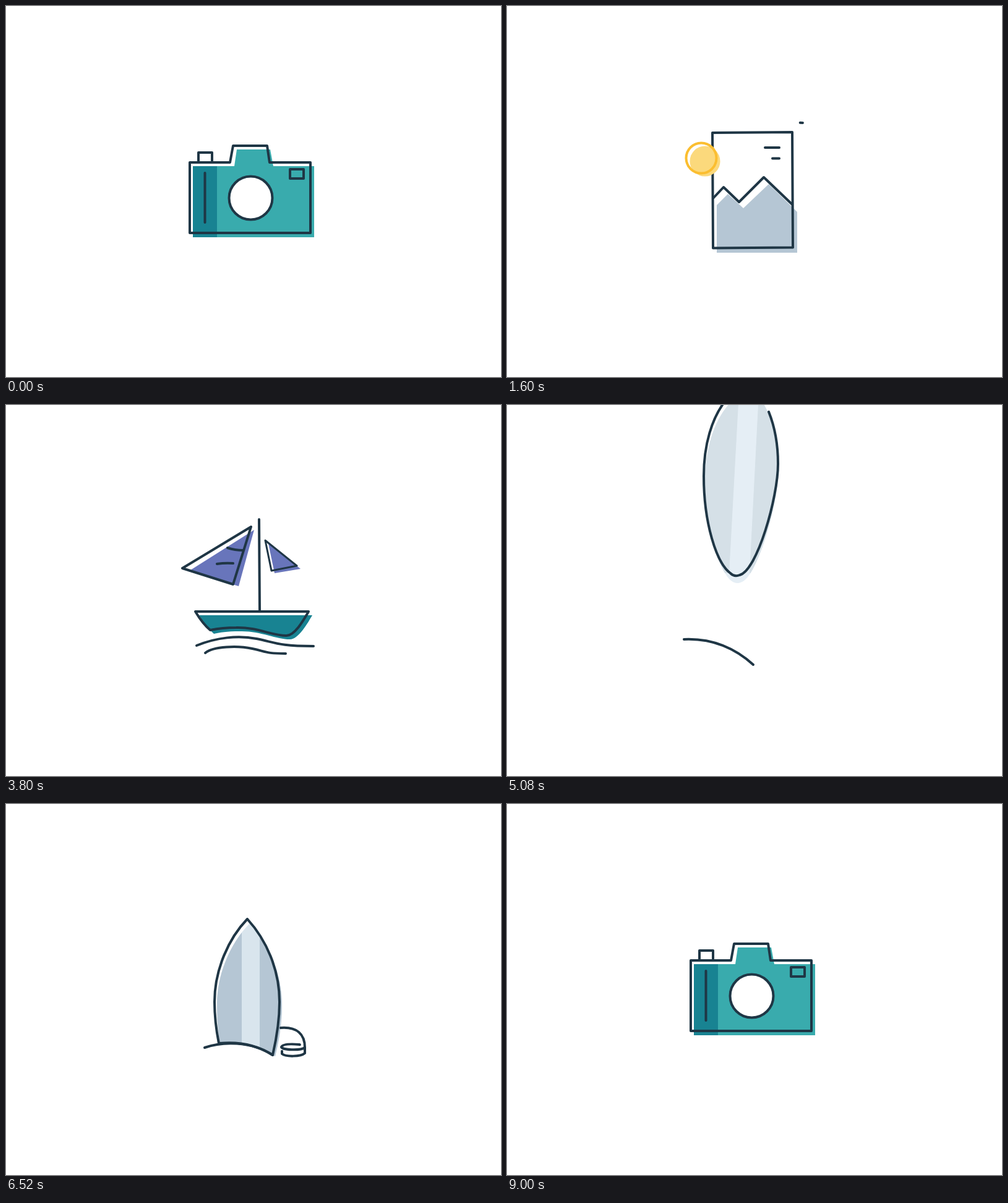
These frames come from a looping animation (800 px wide and 600 px high, 9040 ms). An HTML page:

```html
<!DOCTYPE html>
<html lang="en">
<head>
<meta charset="utf-8">
<title>Holiday icons</title>
<style>
html, body { margin: 0; width: 100%; height: 100%; overflow: hidden; background: #fff; }
svg { display: block; width: 100vw; height: 100vh; }
</style>
</head>
<body>
<svg id="stage" viewBox="0 0 800 600"><defs><clipPath id="boardClip"></clipPath></defs></svg>
<script>
const LOOP = 9040;
const INK = 'rgb(31,54,69)', TEAL = 'rgb(57,171,173)', DEEP = 'rgb(24,131,146)';
const GREY = 'rgb(181,198,212)', PALE = 'rgb(217,229,237)', PURPLE = 'rgb(104,117,187)';
const stage = document.getElementById('stage');
const parts = [];

// Blend two strings by blending the numbers inside them.
const NUM = /-?\d*\.?\d+/g;
function mix(a, b, k) {
  const to = b.match(NUM);
  let i = 0;
  return a.replace(NUM, n => (+n + (to[i++] - n) * k).toFixed(3));
}

function sample(keys, t) {
  if (t <= keys[0][0]) return keys[0][1];
  for (let i = 1; i < keys.length; i++) {
    const [t0, a] = keys[i - 1], [t1, b] = keys[i];
    if (t < t1) {
      const k = (t - t0) / (t1 - t0);
      return mix(a, b, k * k * (3 - 2 * k));
    }
  }
  return keys[keys.length - 1][1];
}

function add(parent, tag, span, attrs, tracks = {}) {
  const el = document.createElementNS('http://www.w3.org/2000/svg', tag);
  for (const name in attrs) el.setAttribute(name, attrs[name]);
  parent.appendChild(el);
  parts.push({ el, span, tracks });
  return el;
}

const shape = (parent, span, fill, tracks, d = '') => add(parent, 'path', span, { fill, d }, tracks);
const line = (parent, span, d, tracks, width = 4) => add(parent, 'path', span, {
  d, fill: 'none', stroke: INK, 'stroke-width': width, pathLength: 100,
  'stroke-linecap': 'round', 'stroke-linejoin': 'round'
}, tracks);
const drawn = (a, b, c, d) => [[a, '0 0'], [b, '0 100'], [c, '0 100'], [d, '100 100']];

// Boat
const AFLOAT = [2800, 4720];
const boat = add(stage, 'g', AFLOAT, {}, { transform: [
  [2900, 'rotate(3 400 370)'], [3400, 'rotate(-1.5 400 370)'], [3800, 'rotate(0 400 370)'],
  [4120, 'rotate(.8 400 370)'], [4400, 'rotate(0 400 370)']] });
const hull = 'L489 334C482 346 467 373 453 373C430 373 405 359 372 360C350 360 340 362 330 364Q318 354 306 334Z';
shape(boat, [2920, 4680], DEEP, { transform: [
  [2920, 'translate(6 6) translate(400 340) scale(1 .85) translate(-400 -340)'],
  [3240, 'translate(6 6) translate(400 340) scale(1 1) translate(-400 -340)'],
  [4320, 'translate(6 6) translate(400 340) scale(1 1) translate(-400 -340)'],
  [4680, 'translate(6 6) translate(400 370) scale(0 0) translate(-400 -340)']] }, 'M306 334' + hull);
line(boat, AFLOAT, 'M306 334' + hull, { trim: drawn(2880, 3360, 4280, 4640) });
line(boat, AFLOAT, 'M410 333L409 185', { trim: drawn(2840, 3240, 4320, 4600) });

const sail = add(boat, 'g', [3000, 4440], {}, { transform: [
  [3000, 'translate(404 250) rotate(40) scale(0)'], [3360, 'translate(397 202) rotate(12) scale(.9)'],
  [3800, 'translate(396 197) rotate(0) scale(1)'], [4120, 'translate(396 197) rotate(-18.5) scale(1)'],
  [4280, 'translate(396 197) rotate(-17) scale(1)']] });
shape(sail, [3000, 4440], PURPLE, {}, 'M5 5L-101 72L-20 96Z');
line(sail, [3000, 4440], 'M0 0L-111 67L-29 93Z', {});
line(sail, [3000, 4440], 'M-13 38Q-26 38 -38 34', { trim: [[3480, '0 0'], [3760, '0 100']] });
line(sail, [3000, 4440], 'M-29 59Q-42 58 -55 60', { trim: [[3520, '0 0'], [3800, '0 100']] });

const jib = add(boat, 'g', [3240, 4640], {}, { transform: [
  [3240, 'translate(412 250) rotate(-30) scale(0)'], [3800, 'translate(419 219) rotate(0) scale(1)'],
  [4160, 'translate(419 219) rotate(13) scale(1.32)'], [4320, 'translate(419 219) rotate(11.5) scale(1.3)'],
  [4640, 'translate(412 240) rotate(-20) scale(0)']] });
shape(jib, [3240, 4640], PURPLE, {}, 'M5 5L57 46L15 53Z');
line(jib, [3240, 4640], 'M0 0L51 41L10 49Z', {}, 3);

line(stage, AFLOAT, 'M308 389C340 376 375 372 405 378S440 390 497 390', { trim: drawn(2960, 3480, 4280, 4680) });
line(stage, AFLOAT, 'M322 401C335 390 375 389 398 394S420 402 452 402', { trim: drawn(3080, 3600, 4320, 4680) });

// Surfboard
const SURF = [4440, 7480], SOLID = [4440, 7200];
const skin = [
  [4440, 'M401 202C401 220 401 235 401 250C401 267 401 285 401 299C372 299 343 298 314 298C328 282 343 266 357 250C372 234 387 218 401 202'],
  [5080, 'M395 -25C425 0 439 50 439 100C439 160 405 275 380 286C374 289 368 289 362 284C340 265 320 190 320 115C322 55 345 -10 395 -25'],
  [5560, 'M394 150C430 190 448 260 448 330C448 362 441 394 433 418C407 402 377 396 344 398C338 374 336 352 336 330C336 260 360 182 394 150'],
  [5960, 'M394 198C427 232 449 277 449 328C449 356 442 385 436 409C409 394 379 388 345 389C340 366 338 345 338 325C338 275 362 226 394 198'],
  [6400, 'M394 193C425 227 446 274 446 326C446 355 441 384 435 408C409 393 379 387 346 388C342 365 341 344 341 324C341 272 365 222 394 193']];
shape(document.getElementById('boardClip'), SOLID, '#000', { d: skin });
shape(stage, SOLID, PALE, { d: skin,
  fill: [[4440, PURPLE], [5000, 'rgb(229,238,245)'], [5120, 'rgb(229,238,245)'], [5800, PALE]] });
const stripes = add(stage, 'g', SOLID, { 'clip-path': 'url(#boardClip)' });
shape(stripes, SOLID, GREY, {
  fill: [[4440, PURPLE], [5000, 'rgb(213,224,231)'], [5120, 'rgb(213,224,231)'], [5800, GREY]],
  d: [
    [4440, 'M290 190L352 190L352 300L290 300ZM380 190L460 190L460 300L380 300Z'],
    [5080, 'M300 -40L376 -40L359 272L300 272ZM408 -40L460 -40L460 272L392 272Z'],
    [5560, 'M310 140L383 140L379 432L310 432ZM412 140L460 140L460 432L408 432Z'],
    [5960, 'M320 180L381 180L381 420L320 420ZM410 180L460 180L460 420L410 420Z'],
    [7160, 'M320 180L381 180L381 420L320 420ZM410 180L460 180L460 420L410 420Z'],
    [7200, 'M320 180L396 180L396 420L320 420ZM396 180L460 180L460 420L396 420Z']] });
line(stage, SURF, '', { trim: [[7160, '0 100'], [7440, '100 100']], d: [
  [4440, 'M396 197C396 215 396 230 396 245C396 262 396 280 396 294C367 294 338 293 309 293C323 277 338 261 352 245C367 229 382 213 396 197'],
  [5080, 'M423 11C433 36 438 65 438 95C438 150 404 268 376 275C371 277 366 277 361 272C338 255 318 190 318 115C318 62 332 22 350 -3'],
  [5560, 'M390 143C426 183 444 254 444 324C444 356 437 390 429 416C403 400 373 394 342 397C335 370 332 348 332 324C332 254 356 175 390 143'],
  [5960, 'M390 191C423 225 445 271 445 322C445 351 438 381 432 407C405 390 375 385 343 388C337 363 334 343 334 321C334 270 358 221 390 191'],
  [6400, 'M390 186C421 220 442 268 442 320C442 350 437 380 431 406C405 389 375 384 344 387C339 362 337 342 337 320C337 268 360 217 390 186']] });
line(stage, SURF, '', { trim: drawn(4520, 4920, 7160, 7400), d: [
  [4520, 'M290 392C330 376 370 380 410 402'], [5080, 'M286 379C330 377 368 393 398 420'],
  [5560, 'M300 402C340 390 390 392 430 417'], [5960, 'M318 396C350 384 395 384 432 407'],
  [6400, 'M321 394C350 384 395 383 431 406']] });
const drop = [[6080, 'translate(0 22)'], [6440, 'translate(0 0)']];
line(stage, [6080, 7480], 'M444 362C470 360 483 372 483 394C476 399 446 398 445 393C447 388 462 388 474 389C478 390 481 391 483 394',
  { transform: drop, trim: [[6080, '0 0'], [6520, '0 93'], [6800, '0 100'], [7160, '0 100'], [7400, '100 100']] });
line(stage, [6080, 7480], 'M483 394V403C476 409 452 409 446 404V394',
  { transform: drop, trim: [[6240, '0 0'], [6520, '0 90'], [6800, '0 100'], [7160, '0 100'], [7360, '100 100']] });

// Camera body, which turns into the mountains and then the hull
const CAMERA = [7200, LOOP + 760];
const mountains = 'M339 322L357 304L382 327L423 288L423 288L469 333L469 399L339 399Z';
const body = 'M302 259L369 259L373 232L427 232L432 259L498 259L498 374L302 374Z';
shape(stage, [7200, LOOP + 2920], TEAL, {
  fill: [[7200, GREY], [7360, TEAL], [LOOP + 240, TEAL], [LOOP + 840, GREY], [LOOP + 2520, GREY], [LOOP + 2880, DEEP]],
  d: [
    [7200, 'M341 324L360 250L380 205L394 193L420 230L446 326L435 408L346 388Z'],
    [7440, 'M304 268L390 264L395 248L462 246L466 262L560 258L563 364L306 376Z'],
    [7600, 'M304 263L382 261L386 240L448 238.5L453 259L531.5 257L534.5 368.5L306.5 375Z'],
    [8040, 'M302 260L367 260L371 229L428 229L433 259L500 259L499 375L302 374Z'],
    [8440, 'M302 259L369 259L373 233L427 233L432 259L497 259L497 374L302 374Z'],
    [8920, body], [LOOP, body],
    [LOOP + 320, 'M304 264L380 262L388 244L446 244L452 262L543 260L543 378L304 380Z'],
    [LOOP + 840, 'M337 330L357 296L380 322L424 276L424 276L472 328L471 404L338 404Z'],
    [LOOP + 1320, mountains], [LOOP + 2440, mountains],
    [LOOP + 2920, 'M312 344L372 344L400 344L440 344L470 344L495 344L459 376L336 370Z']] });
shape(stage, CAMERA, DEEP, { d: [
  [7320, 'M320 290L320 290L321 380L321 380Z'], [7440, 'M304 268L362 265L364 374L306 376Z'],
  [7600, 'M304 263L359 261.5L361 373.5L306.5 375Z'], [8040, 'M302 260L339 260L339 374L302 374Z'],
  [8440, 'M302 259L341 259L341 374L302 374Z'], [LOOP, 'M302 259L341 259L341 374L302 374Z'],
  [LOOP + 320, 'M304 264L310 264L310 380L304 380Z'], [LOOP + 440, 'M310 280L310 280L311 390L311 390Z']] });

const tilt = (x, y, r, s) => `translate(${297 + x} ${367 + y}) rotate(${r}) scale(${s}) translate(-297 -367)`;
const shell = add(stage, 'g', CAMERA, {}, { transform: [
  [7280, tilt(8, 3, -5, .9)], [7600, tilt(4, 1, -1.5, .97)], [8000, tilt(-1, 0, .7, 1.01)], [8400, tilt(0, 0, 0, 1)],
  [LOOP, tilt(0, 0, 0, 1)], [LOOP + 600, tilt(6, 4, -3, .96)]] });
line(shell, CAMERA, 'M333 253V237H311V253H297V367H492V253H426L422 226H367L362 253H311',
  { trim: [[7320, '22 24'], [7600, '5.6 61.4'], [7960, '0 100'], [LOOP, '0 100'], [LOOP + 600, '100 100']] });
line(shell, CAMERA, 'M321.5 350V270',
  { trim: [[7480, '0 0'], [7600, '3 24'], [7920, '0 100'], [LOOP, '0 100'], [LOOP + 360, '100 100']] });
line(shell, CAMERA, 'M459 264H481V279H459Z', { trim: drawn(7680, 8160, LOOP, LOOP + 360) });
line(stage, [7400, 7840], 'M330 353L283 380', { trim: [[7440, '0 0'], [7600, '32 66'], [7800, '100 100']] });
line(stage, [7320, 7760], 'M310 345L258 374.5', { trim: [[7360, '0 0'], [7600, '63 75'], [7720, '100 100']] });

// Picture frame
const FRAMED = [640, 3000];
line(stage, FRAMED, '', { trim: drawn(680, 1320, 2440, 2920), d: [
  [680, 'M458 196L328 202L336 400L466 394Z'], [1320, 'M460 203L331 206L334 393L463 389Z'],
  [1600, 'M461 204L332 205L333 391.5L462 390.5Z'], [2160, 'M462 204L332 204L332 392L462 392Z']] });
line(stage, FRAMED, 'M333 311L350 293L375 317L415 277L461 321', { trim: drawn(960, 1480, 2440, 2840) });
line(stage, FRAMED, 'M440 229H417', { trim: drawn(1240, 1560, 2440, 2640) });
line(stage, FRAMED, 'M440 246.5H429', { trim: drawn(1320, 1600, 2440, 2600) });
line(stage, [1400, 1800], 'M459 188L489 189.5', { trim: [[1440, '0 0'], [1600, '49 63'], [1760, '100 100']] });

// Lens, which turns into the sun
const ROUND = [7280, LOOP + 2880];
add(stage, 'circle', ROUND, {}, {
  fill: [[LOOP, 'rgb(255,255,255)'], [LOOP + 480, 'rgb(251,217,124)']],
  cx: [[LOOP, '395.5'], [LOOP + 600, '386'], [LOOP + 1540, '319.5'], [LOOP + 1600, '320'], [LOOP + 2160, '372'], [LOOP + 2440, '372'], [LOOP + 2760, '286']],
  cy: [[LOOP, '310.5'], [LOOP + 760, '246'], [LOOP + 1400, '251'], [LOOP + 2440, '251'], [LOOP + 2840, '285']],
  r: [[7320, '0'], [7480, '44'], [7600, '39.5'], [7960, '33'], [8280, '35'], [LOOP, '35'], [LOOP + 560, '22'], [LOOP + 1200, '24.5'], [LOOP + 2480, '24.5'], [LOOP + 2840, '0']] });
add(stage, 'circle', ROUND, { fill: 'none', 'stroke-width': 4, pathLength: 360 }, {
  stroke: [[7800, DEEP], [8160, INK], [LOOP, INK], [LOOP + 480, 'rgb(251,190,48)']],
  cx: [[7600, '392'], [8280, '395.5'], [LOOP, '395.5'], [LOOP + 600, '380'], [LOOP + 1540, '313.5'], [LOOP + 1600, '314'], [LOOP + 2160, '366'], [LOOP + 2440, '366'], [LOOP + 2760, '280']],
  cy: [[7600, '307.5'], [8280, '310.5'], [LOOP, '310.5'], [LOOP + 760, '241'], [LOOP + 1400, '246'], [LOOP + 2440, '246'], [LOOP + 2840, '280']],
  r: [[7280, '118'], [7600, '103'], [8080, '33'], [8360, '35'], [LOOP, '35'], [LOOP + 560, '22'], [LOOP + 1200, '24.5'], [LOOP + 2480, '24.5'], [LOOP + 2840, '0']],
  transform: [[7280, 'rotate(40 392 307.5)'], [7600, 'rotate(102 392 307.5)'], [8280, 'rotate(360 395.5 310.5)']],
  trim: [[7280, '0 0'], [7600, '0 75'], [8120, '0 362']] });

function render(time) {
  const now = time % LOOP;
  for (const { el, span, tracks } of parts) {
    const t = now < span[0] ? now + LOOP : now;
    let shown = t <= span[1];
    if (shown) for (const name in tracks) {
      const value = sample(tracks[name], t);
      if (name !== 'trim') { el.setAttribute(name, value); continue; }
      const [from, to] = value.split(' ').map(Number);
      const whole = from === 0 && to === 100;
      shown = to - from > .5;
      el.setAttribute('stroke-dasharray', whole ? 'none' : `${to - from} 999`);
      el.setAttribute('stroke-dashoffset', -from);
    }
    el.style.display = shown ? '' : 'none';
  }
}

const start = performance.now();
function tick() {
  render(performance.now() - start);
  requestAnimationFrame(tick);
}
tick();
</script>
</body>
</html>
```
